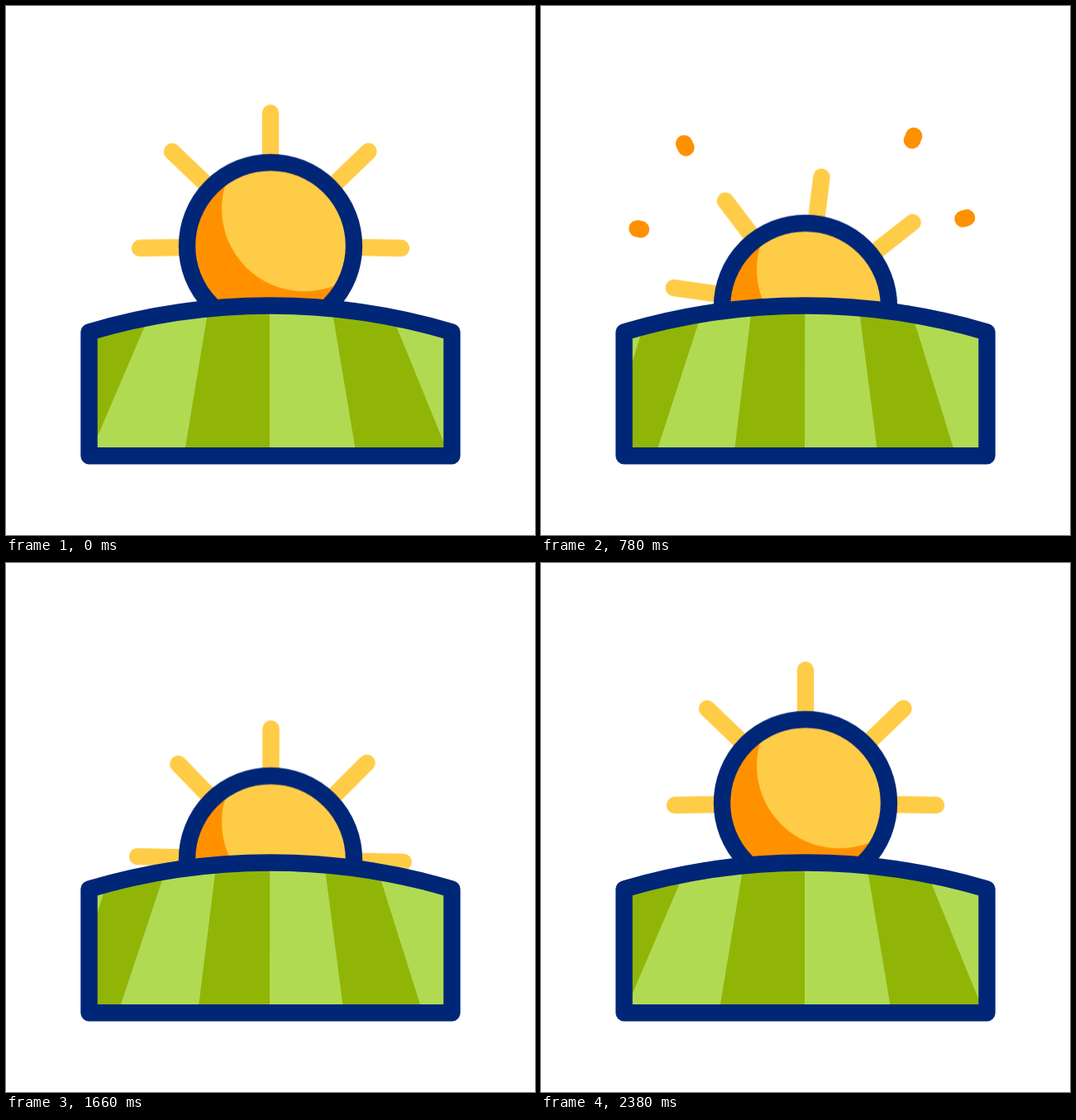
Write an HTML page that moves like this. It is 640 by 640 pixels and loops after 2400 ms.

```html
<!DOCTYPE html>
<html lang="en">
<head>
<meta charset="utf-8">
<title>Sun over a field</title>
<style>
  html, body { margin: 0; height: 100%; overflow: hidden; background: #fff; }
  svg { display: block; width: 100vw; height: 100vh; }

  .navy { stroke: #002677; stroke-width: 20.4; stroke-linejoin: round; }
  .rays, .sparks { fill: none; stroke-width: 20.4; stroke-linecap: round; }
  .rays { stroke: #ffcc47; }
  .sparks { stroke: #ff9100; }

  .sun, .rays, .stripes path {
    animation: 2.4s cubic-bezier(.72, 0, .28, 1) infinite;
  }
  .sun { animation-name: set; }
  .rays { animation-name: turn; }
  .s1 { animation-name: s1 !important; }
  .s2 { animation-name: s2 !important; }
  .s3 { animation-name: s3 !important; }

  @keyframes set {
    0%, 99.167%, 100% { transform: translate(320px, 290.2px); }
    50% { transform: translate(320px, 376px); }
  }
  @keyframes turn {
    0%, 99.167%, 100% { transform: rotate(0deg); }
    50% { transform: rotate(114.6deg); }
  }

  /* stripes narrow towards the middle while the sun is low */
  @keyframes s1 {
    0%, 99.167%, 100% { d: path("M103.9 361.3L179 361.3L98.3 549.7L27.7 549.7Z"); }
    50% { d: path("M137.3 361.3L200.8 361.3L142.9 549.7L80.2 549.7Z"); }
  }
  @keyframes s2 {
    0%, 99.167%, 100% { d: path("M245.6 361.3L319 361.3L319 549.7L214.4 549.7Z"); }
    50% { d: path("M257.1 361.3L319.3 361.3L319 549.7L235.7 549.7Z"); }
  }
  @keyframes s3 {
    0%, 99.167%, 100% { d: path("M393.4 361.3L461.6 361.3L538.4 549.7L424.9 549.7Z"); }
    50% { d: path("M382.6 361.3L442.7 361.3L497.6 549.7L405.5 549.7Z"); }
  }

  /* sparks grow outwards, then follow their outer end */
  .sparks path {
    stroke-dasharray: 1 4;
    animation: dash 2.4s ease-in-out infinite, show 2.4s step-end infinite;
  }
  @keyframes dash {
    0%, 29.17% { stroke-dashoffset: 1; }
    40.83%, 42.5% { stroke-dashoffset: 0; }
    58.33%, 100% { stroke-dashoffset: -1; }
  }
  @keyframes show {
    0% { opacity: 0; }
    29.2% { opacity: 1; }
    58.3%, 100% { opacity: 0; }
  }
</style>
</head>
<body>
<svg viewBox="0 0 640 640">
  <defs>
    <path id="field" d="M100.5 394.5A769 769 0 0 1 539.5 394.5V544.3H100.5Z"/>
    <clipPath id="inField"><use href="#field"/></clipPath>
    <clipPath id="inSun"><circle r="101"/></clipPath>
  </defs>

  <g class="sparks">
    <path pathLength="1" d="M121 270.3L95 264.9"/>
    <path pathLength="1" d="M175.5 171.5L162 142"/>
    <path pathLength="1" d="M449 162.5L461 132"/>
    <path pathLength="1" d="M510.5 257.5L536 250.3"/>
  </g>

  <g class="sun">
    <path class="rays" d="M0 0V-160.7M0 0L118.5 -114.2M0 0L158 2.8M0 0L113 114
      M0 0V161M0 0L-113 114M0 0L-158 2.8M0 0L-119 -114"/>
    <circle r="101" fill="#ff9100"/>
    <circle cx="41" cy="-45" r="100" fill="#ffcc47" clip-path="url(#inSun)"/>
    <circle class="navy" r="101" fill="none"/>
  </g>

  <use href="#field" fill="#b1da53"/>
  <g class="stripes" fill="#91b507" clip-path="url(#inField)">
    <path class="s1" d="M103.9 361.3L179 361.3L98.3 549.7L27.7 549.7Z"/>
    <path class="s2" d="M245.6 361.3L319 361.3L319 549.7L214.4 549.7Z"/>
    <path class="s3" d="M393.4 361.3L461.6 361.3L538.4 549.7L424.9 549.7Z"/>
  </g>
  <use href="#field" class="navy" fill="none"/>
</svg>
</body>
</html>
```
